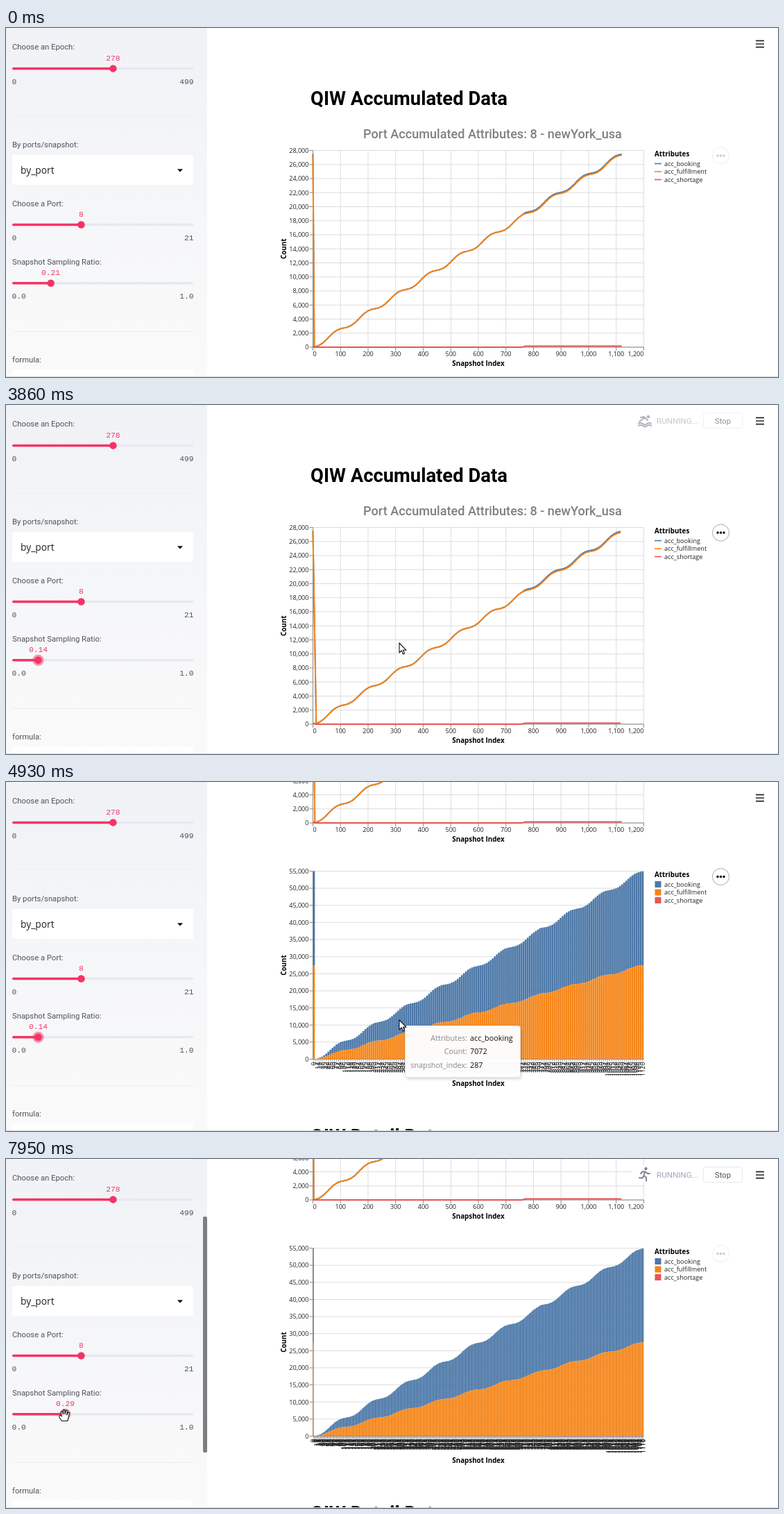
An HTML page for the animation above (8000 ms loop, 1113 by 503 pixels).

```html
<!DOCTYPE html>
<html lang="en">
<head>
<meta charset="utf-8">
<title>Accumulated data dashboard</title>
<style>
html, body { margin: 0; width: 100%; height: 100%; overflow: hidden; background: #fff; }
svg { display: block; width: 100vw; height: 100vh; }
text { white-space: pre; }
.ui { font-family: Roboto, sans-serif; font-size: 11.25px; fill: #4f525c; }
.mono { font-family: "Liberation Mono", monospace; font-size: 11.25px; fill: #50525e; }
.pink { fill: #f63366; }
.axis { font-family: "Open Sans", sans-serif; font-size: 9.1px; fill: #222; }
.bold { font-family: "Open Sans", sans-serif; font-size: 9.8px; font-weight: 700; fill: #000; }
.head { font-family: Roboto, sans-serif; font-size: 27.4px; font-weight: 700; fill: #000; }
.tip { font-family: "Open Sans", sans-serif; font-size: 10.8px; }
</style>
</head>
<body>
<svg id="stage" viewBox="0 0 1113 503"></svg>
<script>
const stage = document.getElementById('stage');
const LOOP = 8000;
const COLORS = ['#4c78a8', '#f58518', '#e45756'];
const SERIES = ['acc_booking', 'acc_fulfillment', 'acc_shortage'];
const LEFT = 442.5, WIDTH = 477;
const LINE = { top: 176.5, base: 460, max: 28000, step: 2000 };
const BARS = { top: 529.5, base: 800.5, max: 55000, step: 5000 };

const text = (x, y, value, cls, extra = '') => `<text x="${x}" y="${y}" class="${cls}" ${extra}>${value}</text>`;
const rect = (x, y, w, h, fill, extra = '') => `<rect x="${x}" y="${y}" width="${w}" height="${h}" fill="${fill}" ${extra}/>`;
const path = (d, stroke, extra = '') => `<path d="${d}" stroke="${stroke}" fill="none" ${extra}/>`;
const END = 'text-anchor="end"', MID = 'text-anchor="middle"';
const yOf = (c, v) => c.base - (c.base - c.top) * v / c.max;

// Data: weekly waves on a straight climb; index 0 holds the previous total.
function sample(i) {
  if (i === 0) return [27500, 27350, 150];
  const turn = 2 * Math.PI * i;
  const done = Math.max(0, 24.4 * i - 290 * Math.sin(turn / 112) + 12 * Math.sin(turn / 14));
  const shortage = 150 * Math.min(1, Math.max(0, (i - 758) / 12));
  return [done + shortage, done, shortage];
}

function indices(step) {
  const list = [];
  for (let i = 0; i <= 1120; i += step) list.push(i);
  return list;
}

function lineMarks(step) {
  const rows = indices(step).map(i => [LEFT + WIDTH * i / 1200, sample(i)]);
  return COLORS.map((color, s) => path('M' + rows.map(([x, v]) =>
    x.toFixed(2) + ' ' + yOf(LINE, v[s]).toFixed(2)).join('L'), color, 'stroke-width="2"')).join('');
}

function barMarks(step) {
  const list = indices(step), band = WIDTH / list.length, w = band * 0.9;
  const d = ['', '', ''];
  let ticks = '', labels = '';
  list.forEach((i, n) => {
    const x = LEFT + band * (n + 0.05), mid = (x + w / 2).toFixed(2);
    const v = sample(i);
    let sum = 0;
    for (let s = 2; s >= 0; s--) {
      const y0 = yOf(BARS, sum);
      sum += v[s];
      d[s] += `M${x.toFixed(2)} ${y0.toFixed(2)}h${w.toFixed(2)}V${yOf(BARS, sum).toFixed(2)}h${(-w).toFixed(2)}Z`;
    }
    ticks += `M${mid} ${BARS.base}v4`;
    labels += `<text transform="translate(${+mid + 3.2} 804.5) rotate(-90)" text-anchor="end">${i}</text>`;
  });
  return d.map((p, s) => `<path d="${p}" fill="${COLORS[s]}"/>`).join('') +
    path(ticks, '#888', 'stroke-width=".7"') + `<g class="axis">${labels}</g>`;
}

function axes(c, xGrid) {
  let grid = '', ticks = '', labels = '';
  for (let v = 0; v <= c.max; v += c.step) {
    const y = yOf(c, v);
    grid += `M${LEFT} ${y}h${WIDTH}`;
    ticks += `M${LEFT} ${y}h-5`;
    labels += text(436.5, y + 3.3, v.toLocaleString('en-US'), 'axis', END);
  }
  if (xGrid) for (let i = 0; i <= 1200; i += 100) {
    const x = LEFT + WIDTH * i / 1200;
    grid += `M${x} ${c.top}V${c.base}`;
    ticks += `M${x} ${c.base}v5`;
    const anchor = i === 0 ? '' : i === 1200 ? END : MID;
    labels += text(x, c.base + 13.3, i.toLocaleString('en-US'), 'axis', anchor);
  }
  return path(grid, '#ddd') +
    path(ticks + `M${LEFT} ${c.top}V${c.base}h${WIDTH}`, '#888') + labels +
    text(681, c.base + (xGrid ? 26.5 : 38), 'Snapshot Index', 'bold', MID) +
    text(0, 0, 'Count', 'bold', `${MID} transform="translate(403.5 ${(c.top + c.base) / 2}) rotate(-90)"`);
}

function legend(c, symbol) {
  return text(935, c.top + 8, 'Attributes', 'bold') + SERIES.map((name, s) => {
    const y = c.top + 19 + s * 11.5;
    return symbol(y, COLORS[s]) + text(949, y + 3.1, name, 'axis');
  }).join('');
}

function menuButton(id, y) {
  const dots = [-4.5, 0, 4.5].map(x => `<circle cx="${1030.5 + x}" cy="${y}" r="1.7"/>`).join('');
  return `<g id="${id}"><circle cx="1030.5" cy="${y}" r="12" fill="#fff" stroke="#aaa"/>${dots}</g>`;
}

function slider(y, label, low, high, id) {
  return text(9, y - 27, label, 'ui') +
    rect(9, y - 1.75, 261, 3.5, '#e6e9ef', 'rx="1.75"') +
    rect(9, y - 1.75, 1, 3.5, '#f63366', `rx="1.75" id="${id}Fill"`) +
    `<circle id="${id}Ring" cy="${y}" r="8.1" fill="#f63366" opacity="0"/>` +
    `<circle id="${id}Thumb" cy="${y}" r="5.25" fill="#f63366"/>` +
    text(0, y - 11.8, '', 'mono pink', `${MID} id="${id}Value"`) +
    text(8.5, y + 22.3, low, 'mono') + text(270.5, y + 22.3, high, 'mono', END);
}

const tipRow = (y, key, value) =>
  text(665, y, key, 'tip', END + ' fill="#888"') + text(669, y, value, 'tip', 'fill="#111"');

const ICONS = [
  // wheelchair, swimmer, gymnast, runner
  'M921 16L919.5 22H925L927 28L929.5 27M917.5 21A5 5 0 1 0 924.5 27M920 19L916 17',
  'M913 24L921 18L925 22M915 18L920 17M912 27Q915 24.5 918 27T924 27T930 27M912 30Q915 27.5 918 30T924 30T930 30',
  'M913 18L920 19L927 16M920 19V25L917 31M920 25L925 30',
  'M915 21L918 18L922 18.5L925 21L928 21M921 18.5L919.5 24L923 26.5V31.5M919.5 24L917.5 27.5L913 27'
];
const HEADS = [[922, 14], [926, 17], [920, 14.5], [922.5, 14]];

const SHAPES = {
  arrow: 'M0 0V14L3.3 11L5.5 16L7.6 15L5.5 10.3H10Z',
  hand: 'M-4 8.5C-7 5 -8.5 2 -7.3 .8C-6.2 0 -5 1 -4.2 2L-5.2 -4C-5.2 -6 -3.2 -6 -2.7 -4L-2 -1V-6.5C-2 -8.4 0 -8.4 .2 -6.5L.6 -1L1.6 -6C2.2 -7.7 4 -7.2 3.7 -5.2L3.2 0L4.6 -3C5.6 -4.7 7.2 -4 6.7 -2L5.5 4L4.3 8.5Z',
  fist: 'M-4 6.5C-7 3 -7.5 0 -4.5 -1V-3C-4 -5 -1.6 -5.2 -1.3 -4C-.5 -5.7 1.8 -5.2 2 -4C3.8 -5 5 -3.6 5 -2.2C7 -2.4 6.6 1 6.2 2.4L4.4 6.5Z'
};

stage.innerHTML = `
<defs>
  <linearGradient id="side" x1="0" y1="0" x2="0" y2="1">
    <stop offset="0" stop-color="#f0f2f6"/><stop offset="1" stop-color="#fafafa"/>
  </linearGradient>
  <filter id="shadow" x="-10%" y="-15%" width="120%" height="135%">
    <feDropShadow dx="1" dy="2" stdDeviation="2" flood-opacity=".16"/>
  </filter>
</defs>
${rect(0, 0, 1113, 503, '#fff')}
<g id="page">
  ${text(439, 110.8, 'QIW Accumulated Data', 'head')}
  ${text(701.5, 158.7, 'Port Accumulated Attributes: 8 - newYork_usa', 'ui', MID + ' style="font-size:18.1px;font-weight:500;fill:#808080"')}
  ${axes(LINE, true)}<g id="lines"></g>
  ${legend(LINE, (y, c) => path(`M935 ${y}h10`, c, 'stroke-width="1.6"'))}
  ${menuButton('menu0', 184)}
  ${axes(BARS, false)}<g id="bars"></g>
  ${legend(BARS, (y, c) => rect(935.5, y - 4.5, 9, 9, c))}
  ${menuButton('menu1', 537.5)}
  ${text(439, 921.3, 'QIW Detail Data', 'head')}
</g>
<g id="tooltip">
  ${rect(575.5, 351.5, 166, 74, '#fff', 'fill-opacity=".96" stroke="#e4e4e4" rx="3" filter="url(#shadow)"')}
  ${tipRow(373, 'Attributes:', 'acc_booking')}${tipRow(392.3, 'Count:', '7072')}${tipRow(412, 'snapshot_index:', '287')}
</g>
<g id="status">
  ${rect(903, 10, 163, 24, '#fff')}
  <g stroke="#808495" stroke-width="2" stroke-linecap="round" stroke-linejoin="round">
    <path id="icon" fill="none"/><circle id="iconHead" r="1.2" fill="#808495"/>
  </g>
  ${text(938, 27, 'RUNNING...', 'ui', 'style="font-size:11.6px;fill:#a3a8b8"')}
  ${rect(1005.5, 11.5, 56, 22, '#fff', 'stroke="#e6e9ef" rx="3"')}
  ${text(1033.5, 26.5, 'Stop', 'ui', MID)}
</g>
${path('M1081 18.3h12M1081 23h12M1081 27.7h12', '#262730', 'stroke-width="1.7"')}
${rect(0, 0, 290, 503, 'url(#side)')}
${rect(9, -8, 261, 9, '#fff', 'rx="3"')}
${slider(58.4, 'Choose an Epoch:', '0', '499', 'epoch')}
${path('M9 126.5H270M9 437.5H270', '#eceef2')}
${text(9, 172.3, 'By ports/snapshot:', 'ui')}
${rect(9, 183, 261, 43, '#fff', 'rx="3"')}
${text(21, 210, 'by_port', 'ui', 'style="font-family:Open Sans,sans-serif;font-size:13.8px;fill:#222"')}
<path d="M247 203.3h8l-4 4.2Z" fill="#111"/>
${slider(283.5, 'Choose a Port:', '0', '21', 'port')}
${slider(367.8, 'Snapshot Sampling Ratio:', '0.0', '1.0', 'ratio')}
${text(9, 482, 'formula:', 'ui')}
${rect(9, 492, 261, 14, '#fff', 'rx="3"')}
${rect(284, 83, 6, 340, '#7d7e80', 'rx="2" id="scrollbar"')}
${path('M0 502.5H1113', '#dcdcdc')}
<g id="cursor">
  <circle id="press" r="9.3" fill="#ffeb3b" stroke="#e5cf2a" opacity=".9"/>
  <path id="pointer" fill="#fff" stroke="#111" stroke-width="1.1" stroke-linejoin="round"/>
</g>`;

const el = {};
stage.querySelectorAll('[id]').forEach(node => el[node.id] = node);
const set = (node, attrs) => { for (const k in attrs) node.setAttribute(k, attrs[k]); };
const show = (node, on) => set(node, { visibility: on ? 'visible' : 'hidden' });

function setSlider(id, x, value) {
  set(el[id + 'Fill'], { width: x - 9 });
  set(el[id + 'Thumb'], { cx: x });
  set(el[id + 'Ring'], { cx: x });
  set(el[id + 'Value'], { x });
  el[id + 'Value'].textContent = value;
}
setSlider('epoch', 154.4, 278);
setSlider('port', 108.4, 8);

// Keys are [time, ...values], linear between neighbours.
function track(keys, t) {
  if (t <= keys[0][0]) return keys[0].slice(1);
  const n = keys.findIndex(k => k[0] > t);
  if (n < 0) return keys[keys.length - 1].slice(1);
  const a = keys[n - 1], b = keys[n], p = (t - a[0]) / (b[0] - a[0]);
  return a.slice(1).map((v, i) => v + (b[i + 1] - v) * p);
}

const POINTER = [[210, 600, 490], [440, 430, 410], [900, 31, 373], [1390, 30, 373], [1460, 29, 366],
  [3169, 29, 366], [3170, 30, 367], [3240, 30, 367], [3400, 47, 367], [3560, 47, 367], [3850, 567, 343],
  [5130, 567, 343], [5390, 52, 375], [5470, 46, 368], [5640, 46, 366], [5850, 64, 366], [5930, 64, 365],
  [6940, 64, 365], [7110, 65, 369], [7340, 65, 369], [7570, 84.5, 369]];
const RATIO = [[0, .21], [1389, .21], [1390, .08], [3240, .08], [3400, .14], [5640, .14], [5850, .21], [7340, .21], [7570, .29]];
const SCROLL = [[4459, 0], [4460, 148], [4530, 148], [4680, 401]];
const PRESSES = [[1390, 1460], [3170, 3480], [5620, 5880], [7110, 7640]];
const STEPS = [[0, 5], [2080, 12], [4230, 7], [6560, 5], [7880, 3]];
const RUNS = [
  { icon: 3, keys: [[1690, .1], [1850, 1], [2310, 1], [2540, 0]] },
  { icon: 1, keys: [[3770, .05], [3920, 1], [4390, 1], [4530, 0]] },
  { icon: 2, keys: [[6160, .1], [6410, 1], [6940, 1], [7110, 0]] },
  { icon: 0, keys: [[7490, .1], [7720, 1]] }
];

let shownStep = 0;
function drawCharts(step) {
  if (step === shownStep) return;
  shownStep = step;
  el.lines.innerHTML = lineMarks(step);
  el.bars.innerHTML = barMarks(step);
}

function drawStatus(t) {
  const run = RUNS.filter(r => t >= r.keys[0][0]).pop();
  set(el.status, { opacity: run ? track(run.keys, t)[0] : 0 });
  if (!run) return;
  const n = (Math.floor((t - run.keys[0][0]) / 150) + run.icon) % ICONS.length;
  set(el.icon, { d: ICONS[n] });
  set(el.iconHead, { cx: HEADS[n][0], cy: HEADS[n][1] });
}

function render(t) {
  const [x, y] = track(POINTER, t), [scroll] = track(SCROLL, t), [ratio] = track(RATIO, t);
  const visible = t >= 210;
  const pressed = PRESSES.some(([a, b]) => t >= a && t < b);
  const onThumb = visible && x < 110 && Math.abs(y - 367.8) < 7.5 && Math.abs(x - 10 - 260 * ratio) < 9;

  drawCharts(STEPS.filter(s => t >= s[0]).pop()[1]);
  drawStatus(t);
  set(el.page, { transform: `translate(0 ${-scroll})` });
  setSlider('ratio', 10 + 260 * ratio, ratio.toFixed(2));
  set(el.ratioRing, { opacity: t >= 1390 ? .5 : 0 });

  const pageY = y + scroll, overMain = visible && x > 390 && x < 1045;
  set(el.menu0, { opacity: overMain && pageY > 165 && pageY < 496 ? 1 : .2 });
  set(el.menu1, { opacity: overMain && pageY > 518 && pageY < 850 ? 1 : .2 });
  show(el.tooltip, t >= 4760 && t < 5130);
  show(el.scrollbar, visible && x < 290);

  show(el.cursor, visible);
  set(el.cursor, { transform: `translate(${x} ${y})` });
  set(el.press, { opacity: pressed ? .9 : 0 });
  set(el.pointer, { d: SHAPES[pressed ? 'fist' : onThumb ? 'hand' : 'arrow'] });
}

const start = performance.now();
function tick(now) {
  render(Math.max(0, now - start) % LOOP);
  requestAnimationFrame(tick);
}
render(0);
requestAnimationFrame(tick);
</script>
</body>
</html>
```
